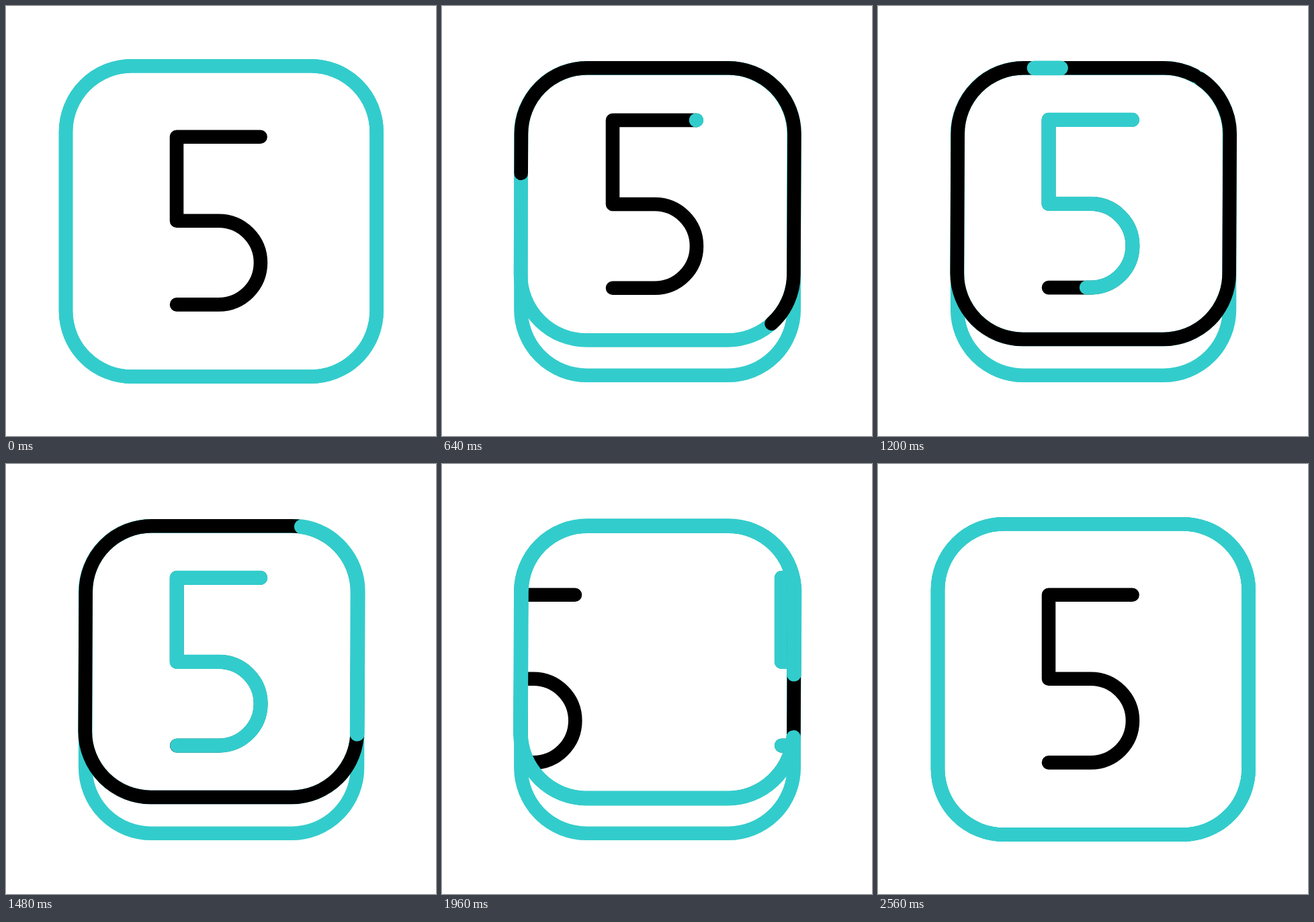
Write an HTML page that moves like this. It is 640 px wide and 640 px high and loops after 2800 ms.

```html
<!DOCTYPE html>
<html lang="en">
<head>
<meta charset="utf-8">
<title>Key five</title>
<style>
  html, body { margin: 0; width: 100%; height: 100%; overflow: hidden; background: #fff; }
  svg { display: block; width: 100%; height: 100%; }
  path { fill: none; stroke-width: 20.6; stroke-linecap: round; stroke-linejoin: round; }
  .teal { stroke: #33cccc; }
  .black { stroke: #000; }
</style>
</head>
<body>
<svg viewBox="0 0 640 640">
  <defs>
    <clipPath id="inside"><path id="clip"/></clipPath>
  </defs>
  <path id="back" class="teal"/>
  <path id="face" class="teal"/>
  <g clip-path="url(#inside)">
    <g id="oldDigit">
      <path class="digit black"/>
      <path id="tint" class="digit teal" style="stroke-width:21.2"/>
    </g>
    <g id="newDigit"><path class="digit black"/></g>
  </g>
  <path id="dark" class="black" pathLength="1452"/>
  <path id="light" class="teal" pathLength="1452"/>
</svg>
<script>
const LOOP = 2800, RING = 1452, DIGIT = 572, TRAVEL = 432;
const $ = id => document.getElementById(id);
const mix = (a, b, k) => a + (b - a) * k;

for (const el of document.querySelectorAll('.digit')) {
  el.setAttribute('d', 'M378.6 194.7H254V319.7H316.6a62.35 62.35 0 0 1 0 124.7H254');
}
$('tint').setAttribute('pathLength', DIGIT);

// cubic-bezier(.66, 0, .1625, 1) between two times
function ease(t, from, to) {
  const x = (t - from) / (to - from);
  if (x <= 0) return 0;
  if (x >= 1) return 1;
  let lo = 0, hi = 1;
  for (let i = 0; i < 30; i++) {
    const s = (lo + hi) / 2, r = 1 - s;
    if (3 * r * r * s * 0.66 + 3 * r * s * s * 0.1625 + s * s * s < x) lo = s;
    else hi = s;
  }
  return lo * lo * (3 - 2 * lo);
}

// rounded box whose lower half may be shifted sideways
function box(left, right, top, bottom, shift) {
  const r = 98, l = left + shift, e = right + shift;
  return `M${left + r} ${top}H${right - r}A${r} ${r} 0 0 1 ${right} ${top + r}` +
    `L${e} ${bottom - r}A${r} ${r} 0 0 1 ${e - r} ${bottom}` +
    `H${l + r}A${r} ${r} 0 0 1 ${l} ${bottom - r}` +
    `L${left} ${top + r}A${r} ${r} 0 0 1 ${left + r} ${top}Z`;
}

function trim(el, start, length, total) {
  el.style.display = length > 0 ? '' : 'none';
  if (length >= total - 0.5) {
    el.style.strokeDasharray = 'none';
    return;
  }
  el.style.strokeDasharray = `${length} ${total - length}`;
  el.style.strokeDashoffset = -(start % total);
}

function draw(t) {
  const rise = ease(t, 40, 796);
  const k = rise - ease(t, 1843, 2567);

  const face = box(mix(89, 118.7, k), mix(551.6, 523.7, k),
    mix(89.3, 92.3, k), mix(551.6, 496, k), -k);
  for (const id of ['face', 'clip', 'dark', 'light']) $(id).setAttribute('d', face);
  $('back').setAttribute('d', box(mix(89, 118.2, k), mix(551.6, 523, k),
    mix(89.3, 92.3, k), mix(551.6, 549.7, k), 0));

  trim($('dark'), 726 + 0.855 * (t - 40), t < 2200 ? RING * ease(t, 40, 1347) : 0, RING);
  trim($('light'), 1295 + 0.7425 * (t - 968), RING * ease(t, 968, 2393), RING);
  $('light').style.strokeWidth = mix(20.6, 21.8, k);

  const dx = TRAVEL * ease(t, 1457, 2564);
  trim($('tint'), 0, DIGIT * ease(t, 620, 1522), DIGIT);
  $('oldDigit').setAttribute('transform', `translate(${dx} ${-25.3 * rise})`);
  $('newDigit').setAttribute('transform', `translate(${dx - TRAVEL} 0)`);
  // before the slide only the old digit shows, after it only the new one
  $('newDigit').style.display = dx > 0 ? '' : 'none';
  $('oldDigit').style.display = dx < TRAVEL ? '' : 'none';
}

const begin = performance.now();
function tick() {
  draw((performance.now() - begin) % LOOP);
  requestAnimationFrame(tick);
}
tick();
</script>
</body>
</html>
```
